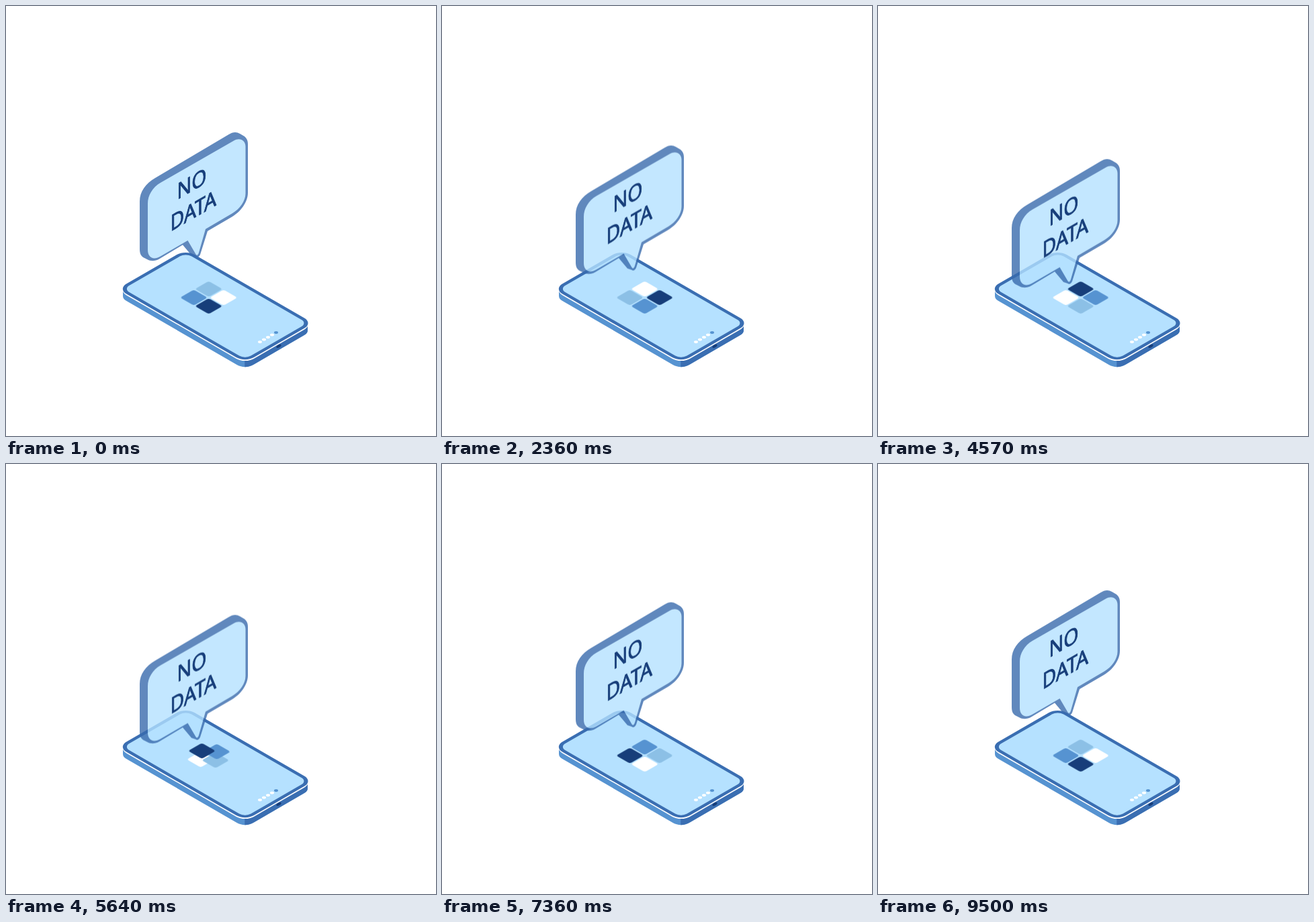
Recreate the animation shown at these times as an HTML page without scripts. Size 640x640 px, loop 9.57 s.

```html
<!DOCTYPE html>
<html lang="en">
<head>
<meta charset="utf-8">
<title>No data</title>
<style>
  html, body { margin: 0; width: 100%; height: 100%; overflow: hidden; background: #fff; }
  svg { display: block; width: 100vw; height: 100vh; }

  :root {
    --navy: #173e7a;
    --edge: #3a6eb2;
    --mid: #5693d1;
    --soft: #8cc0e6;
    --pale: #b5e1ff;
    --ease: cubic-bezier(.333, 0, .667, 1);
    /* corners of the tile block, in isometric units */
    --top: translate(-12.8px, -12.8px);
    --left: translate(-12.8px, 12.8px);
    --bottom: translate(12.8px, 12.8px);
    --right: translate(12.8px, -12.8px);
  }

  .bubble { animation: hover 9.57s var(--ease) infinite; }
  .shell { opacity: .8; }
  .bubble text {
    font: 500 33px "Noto Sans", sans-serif;
    fill: var(--navy);
    stroke: var(--navy);
    stroke-width: .8px;
  }
  @keyframes hover {
    50% { transform: translateY(40px); }
  }

  .tile { animation: orbit 9.57s var(--ease) infinite; }
  .white { fill: #fff; --a: var(--right); --b: var(--top); --c: var(--left); --d: var(--bottom); }
  .soft { fill: var(--soft); --a: var(--top); --b: var(--left); --c: var(--bottom); --d: var(--right); }
  .mid { fill: var(--mid); --a: var(--left); --b: var(--bottom); --c: var(--right); --d: var(--top); }
  .navy { fill: var(--navy); --a: var(--bottom); --b: var(--right); --c: var(--top); --d: var(--left); }
  @keyframes orbit {
    0% { transform: var(--a); }
    17.9%, 24.7% { transform: var(--b); }
    42.6%, 50.5% { transform: var(--c); }
    68.4%, 76.2% { transform: var(--d); }
    94.1%, 100% { transform: var(--a); }
  }
</style>
</head>
<body>
<svg viewBox="0 0 640 640">
  <defs>
    <rect id="slab" width="219" height="117" rx="15"/>
    <rect id="tile" x="-11.8" y="-11.8" width="23.6" height="23.6" rx="3.5"/>
    <ellipse id="dot" rx="3" ry="1.9"/>
  </defs>

  <g class="phone">
    <path fill="var(--mid)" d="M174 421V431.5Q174 436 179.4 439L342.8 533.5Q355.8 541 368.8 533.5L443.6 490Q449 487 449 482.5V471Z"/>
    <path fill="var(--edge)" d="M355.3 520V537.2Q362 537.4 368.8 533.5L443.6 490Q449 487 449 482.5V471Z"/>
    <use href="#slab" fill="#fff" transform="matrix(.866 .5 -.866 .5 267.5 364.4)"/>
    <g transform="matrix(.866 .5 -.866 .5 267.5 362.6)">
      <use href="#slab" fill="var(--edge)"/>
      <rect x="5" y="5" width="209" height="107" rx="10" fill="var(--pale)"/>
    </g>
    <g fill="#fff">
      <use href="#dot" x="378" y="500"/>
      <use href="#dot" x="384" y="496.5"/>
      <use href="#dot" x="390" y="493"/>
      <use href="#dot" x="396" y="489.5"/>
      <use href="#dot" x="402" y="486" fill="var(--mid)"/>
    </g>
    <ellipse rx="4" ry="2" fill="var(--navy)" transform="translate(406 506.3) rotate(-30)"/>
  </g>

  <g transform="matrix(.866 .5 -.866 .5 301.7 434)">
    <use class="tile white" href="#tile"/>
    <use class="tile soft" href="#tile"/>
    <use class="tile mid" href="#tile"/>
    <use class="tile navy" href="#tile"/>
  </g>

  <g class="bubble">
    <g class="shell">
      <path fill="#396bad" d="M199 291C199 276 208 264 222 256L331 191.5C338 187 343 187 348 190L354 193.5C358 196 360 200 360 206V278C360 292 349 306.5 336 314L300 335L289 370Q286 376 282 373L276 371L263 355.5L228 376.5C222 380 215 380 210 377L204 374C200 371 199 367 199 361Z"/>
      <path fill="var(--pale)" d="M211 294C211 282 218 270 230 263L339 200.5C348 195 356.5 200 356.5 209V279C356.5 290 348 302 337 308.5L297 332L287 367Q285 373 282.5 369.5L270.5 349L230 372.5C219 379 211 374 211 363Z"/>
    </g>
    <text transform="matrix(.866 -.5 0 1 254.6 288.5)">NO</text>
    <text transform="matrix(.866 -.5 0 1 244.4 336)">DATA</text>
  </g>
</svg>
</body>
</html>
```
